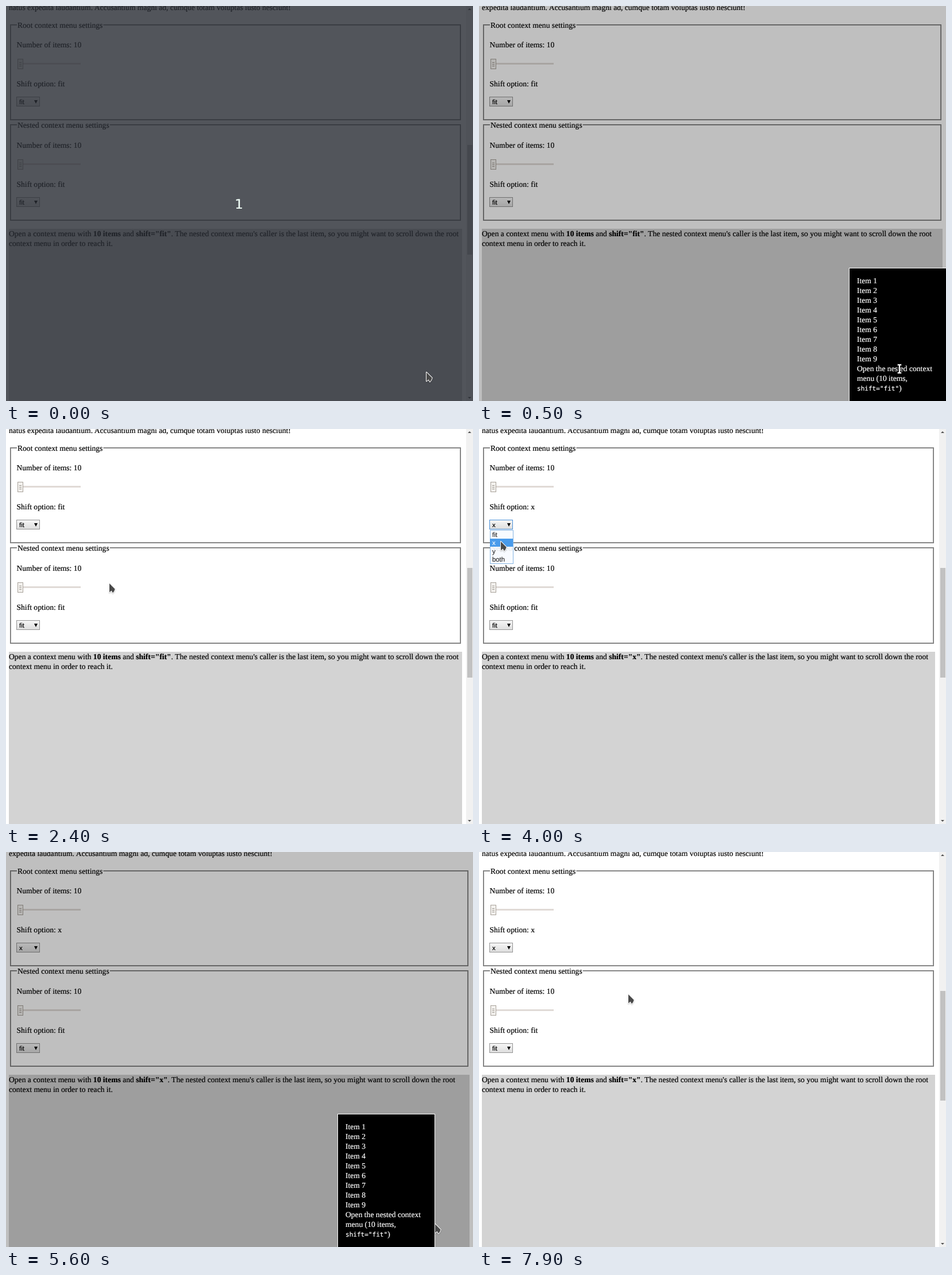
An HTML page with a canvas that plays this animation: 813x688 px, repeating every 8000 ms.

```html
<!DOCTYPE html>
<html lang="en">
<head>
<meta charset="utf-8">
<title>Context menu demo</title>
<style>
html, body { margin: 0; width: 813px; height: 688px; overflow: hidden; background: #fff; }
canvas { display: block; }
</style>
</head>
<body>
<canvas id="stage" width="813" height="688"></canvas>
<script>
const ctx = document.getElementById('stage').getContext('2d');
const W = 813, H = 688, LOOP = 8000, STEP = 100, LINE = 17;
const SERIF = '13.6px "Liberation Serif", serif';
const BOLD = 'bold ' + SERIF;
const SANS = '11.33px "Liberation Sans", sans-serif';
const MONO = '11.05px "DejaVu Sans Mono", monospace';
const POINTER = new Path2D('M0 0V15.5L3.5 12.5 6 16.5 8.3 13.5 9.7 9.7Z');
const OPTIONS = ['fit', 'x', 'y', 'both'];
ctx.textRendering = 'geometricPrecision';

// Pointer moves: start, end, x and y reached
const HOME = { x: 732, y: 638 };
const MOVES = [
  [300, 500, 732, 632],
  [500, 800, 713, 463],
  [1400, 1800, 526, 441],
  [2300, 2400, 180, 269],
  [2800, 2900, 38, 168],
  [3600, 3700, 38, 196],
  [4100, 4500, 732, 632],
  [4600, 5000, 747, 648],
  [6600, 7100, 751, 648],
  [7700, 7900, 260, 248]
];

const between = (t, a, b) => t >= a && t < b;
const ease = k => k * k * (3 - 2 * k);

function pointerAt(t) {
  let { x, y } = HOME;
  for (const [start, end, toX, toY] of MOVES) {
    const k = ease(Math.min(1, Math.max(0, (t - start) / (end - start))));
    x += (toX - x) * k;
    y += (toY - y) * k;
  }
  return [Math.round(x), Math.round(y)];
}

function rect(x, y, w, h, color) {
  ctx.fillStyle = color;
  ctx.fillRect(x, y, w, h);
}

function frame(x, y, w, h, color) {
  ctx.strokeStyle = color;
  ctx.lineWidth = 1;
  ctx.strokeRect(x + .5, y + .5, w - 1, h - 1);
}

// Small triangle; a negative height points up
function triangle(x, y, w, h) {
  ctx.beginPath();
  ctx.moveTo(x - w / 2, y);
  ctx.lineTo(x + w / 2, y);
  ctx.lineTo(x, y + h);
  ctx.fill();
}

// Draws text and returns the x where it ends
function text(str, x, y, color = '#000', font = SERIF) {
  ctx.font = font;
  ctx.fillStyle = ctx.strokeStyle = color;
  ctx.lineWidth = .2;
  ctx.fillText(str, x, y);
  ctx.strokeText(str, x, y);
  return x + ctx.measureText(str).width;
}

function slider(y) {
  rect(20, y + 7, 110, 3, '#e0dad6');
  rect(20, y, 10, 18, '#f3f1ee');
  frame(20, y, 10, 18, '#a8a29a');
  for (let i = 0; i < 3; i++) rect(23, y + 6 + i * 3, 4, 1, '#99938b');
}

function select(y, value, focus) {
  const fill = ctx.createLinearGradient(0, y, 0, y + 17);
  fill.addColorStop(0, '#f7f7f7');
  fill.addColorStop(1, '#dcdcdc');
  rect(18, y, 41, 17, fill);
  frame(18, y, 41, 17, focus ? '#4a90d9' : '#949494');
  text(value, 23, y + 13, '#000', SANS);
  triangle(52, y + 6, 6, 6);
}

function fieldset(top, bottom, title, right, value, focus) {
  const w = right - 7, h = bottom - top, base = bottom - 199;
  frame(7, top, w, h, '#737373');
  frame(8, top + 1, w - 2, h - 2, '#9a9a9a');
  ctx.font = SERIF;
  rect(19, top, ctx.measureText(title).width + 2, 2, '#fff');
  text(title, 20, top + 6);
  text('Number of items: 10', 18.5, base + 72);
  slider(base + 92);
  text('Shift option: ' + value, 18.5, base + 140);
  select(base + 158, value, focus);
}

function scrollbar() {
  rect(801, 0, 12, H, '#f1f1f1');
  rect(803, 242, 9, 191, '#c1c1c1');
  ctx.fillStyle = '#505050';
  triangle(807, 7, 6, -3);
  triangle(807, 681, 6, 3);
}

function page(shift, locked, focus) {
  const right = locked ? 805 : 792;
  rect(0, 0, W, H, '#fff');
  text((locked ? '' : 'natus ') + 'expedita laudantium. Accusantium magni ad, cumque totam voluptas iusto nesciunt!', 5, 7);
  fieldset(32, 199, 'Root context menu settings', right, shift, focus);
  fieldset(206, 374, 'Nested context menu settings', right, 'fit', false);
  rect(5, 388, right - 3, 300, '#d3d3d3');
  let x = text('Open a context menu with ', 5, 401);
  x = text('10 items', x, 401, '#000', BOLD);
  x = text(' and ', x, 401);
  x = text(`shift="${shift}"`, x, 401, '#000', BOLD);
  text(". The nested context menu's caller is the last item, so you might want to scroll down the root", x, 401);
  text('context menu in order to reach it.', 5, 401 + LINE);
  if (!locked) scrollbar();
}

function menu(x, y, w, items) {
  rect(x, y, w, H - y, '#000');
  frame(x, y, w, H - y + 1, '#fff');
  items.forEach((item, i) => text(item, x + 14, y + 27 + i * LINE, '#fff'));
}

const itemNames = n => Array.from({ length: n }, (_, i) => 'Item ' + (i + 1));

function rootMenu(x) {
  menu(x, 456, 170, [...itemNames(9), 'Open the nested context', 'menu (10 items,']);
  const y = 483 + 11 * LINE;
  text(')', text('shift="fit"', x + 14, y, '#fff', MONO), y, '#fff');
}

function dropdown(alpha, active) {
  ctx.globalAlpha = alpha;
  rect(19, 176, 41, 59, '#f8fbff');
  frame(19, 176, 41, 59, '#7fb0e0');
  OPTIONS.forEach((name, i) => {
    const y = 176.5 + i * 14.5;
    if (i === active) rect(19, Math.round(y), 40, 14, '#3d94ea');
    text(name, 23, Math.round(y + 11), i === active ? '#fff' : '#222', SANS);
  });
  ctx.globalAlpha = 1;
}

function arrow(x, y) {
  ctx.save();
  ctx.translate(x, y);
  ctx.shadowColor = 'rgba(0,0,0,.25)';
  ctx.shadowBlur = 2;
  ctx.shadowOffsetY = 1;
  ctx.lineWidth = 2;
  ctx.lineJoin = 'round';
  ctx.strokeStyle = '#fff';
  ctx.stroke(POINTER);
  ctx.shadowColor = 'transparent';
  ctx.fillStyle = '#4a4a4a';
  ctx.fill(POINTER);
  ctx.restore();
}

function beam(x, y) {
  const layer = (grow, color) => {
    rect(x - 1 - grow, y - 8, 2 + grow * 2, 16, color);
    for (const end of [-8, 6]) rect(x - 3 - grow, y + end - grow, 6 + grow * 2, 2 + grow * 2, color);
  };
  layer(1, '#333');
  layer(0, '#fff');
}

function draw(t) {
  const shift = t < 4000 ? 'fit' : 'x';
  const first = between(t, 400, 2300), second = between(t, 5600, 7600);
  page(shift, first || second, between(t, 3100, 5600));

  if (first || second) {
    rect(0, 0, W, H, 'rgba(0,0,0,.25)');
    rootMenu(first ? 644 : 577);
    if (between(t, 600, 2300)) menu(748, 489, 66, itemNames(10));
  }

  if (between(t, 3100, 4100)) {
    const alpha = t < 3300 ? .6 : t < 4000 ? 1 : .93;
    dropdown(alpha, t < 3700 ? 0 : 1);
  }

  if (t < 300) {
    rect(0, 0, W, H, 'rgba(39,43,51,.8)');
    ctx.textAlign = 'center';
    text('1', 405.5, 353, '#f1fff8', '23px "DejaVu Sans", sans-serif');
    ctx.textAlign = 'left';
  }

  (between(t, 400, 700) ? beam : arrow)(...pointerAt(t));
}

function tick() {
  const t = performance.now() % LOOP;
  draw(t - t % STEP);
  requestAnimationFrame(tick);
}
tick();
</script>
</body>
</html>
```
